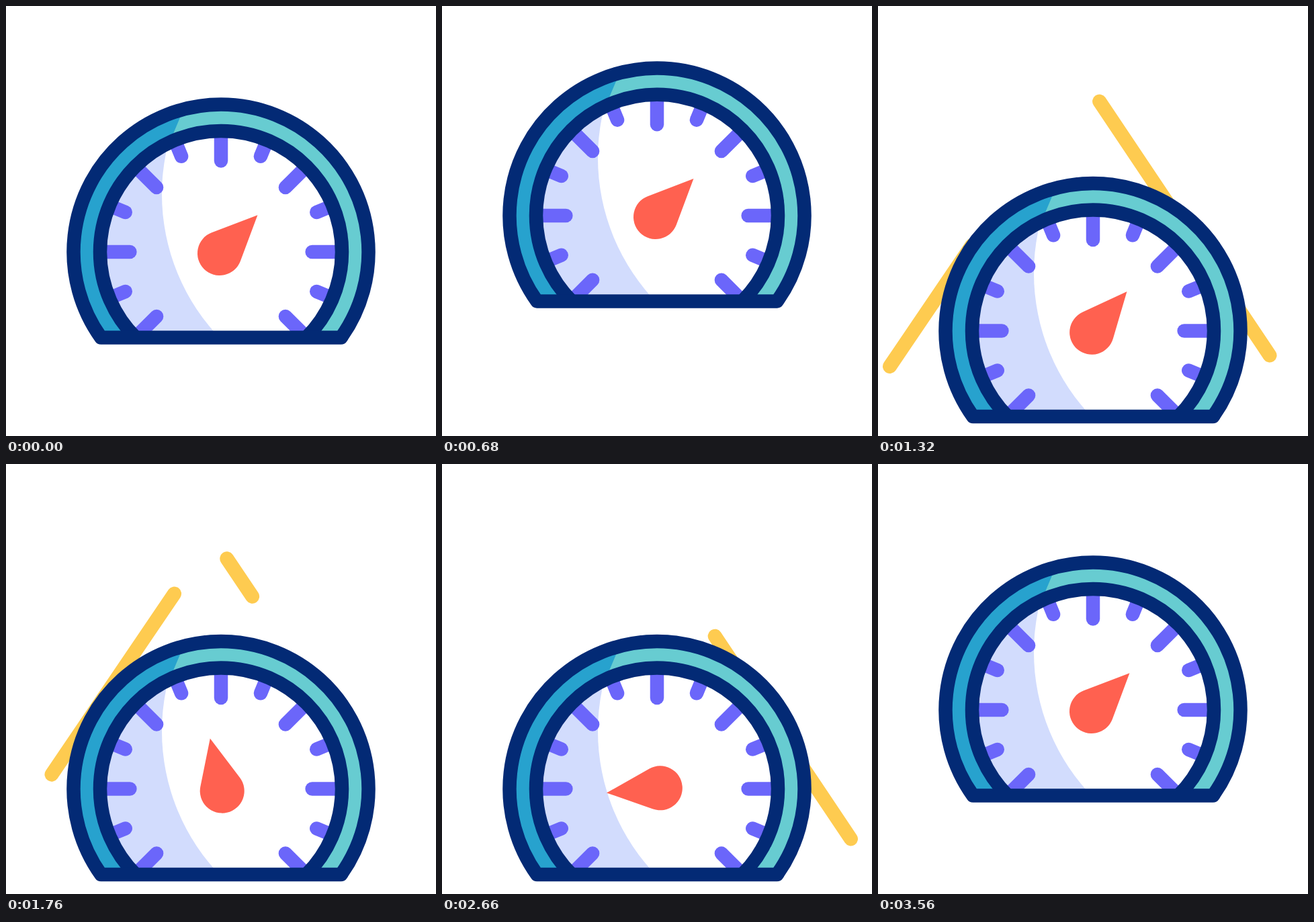
An HTML page that plays this animation: 640x640 px, repeating every 3600 ms.

```html
<!DOCTYPE html>
<html lang="en">
<head>
<meta charset="utf-8">
<title>Speed gauge</title>
<style>
html, body { margin: 0; width: 100%; height: 100%; overflow: hidden; background: #fff; }
svg { display: block; width: 100vw; height: 100vh; }
</style>
</head>
<body>
<svg viewBox="0 0 640 640">
  <defs>
    <clipPath id="dial"><path d="M193 493.5A180 180 0 1 1 447 493.5Z"/></clipPath>
    <clipPath id="rim"><path d="M141.3 493.5A219.5 219.5 0 1 1 498.7 493.5Z"/></clipPath>
  </defs>
  <g fill="none" stroke="#fecb50" stroke-width="21" stroke-linecap="round">
    <line id="left"/>
    <line id="right"/>
  </g>
  <g id="gauge">
    <g clip-path="url(#rim)">
      <rect x="90" y="136" width="460" height="368" fill="#67ccd1"/>
      <path d="M276 126L243 204V504H80V126Z" fill="#27a2ce"/>
    </g>
    <g clip-path="url(#dial)">
      <rect x="130" y="176" width="380" height="328" fill="#d2dcfd"/>
      <circle cx="541" cy="280" r="309" fill="#fff"/>
      <rect x="400" y="176" width="110" height="328" fill="#fff"/>
      <g id="ticks" stroke="#6b66fa" stroke-width="20.5" stroke-linecap="round"/>
    </g>
    <g fill="none" stroke="#032a75" stroke-width="20.5" stroke-linejoin="round">
      <path d="M193 493.5A180 180 0 1 1 447 493.5"/>
      <path d="M141.3 493.5A219.5 219.5 0 1 1 498.7 493.5Z"/>
    </g>
    <path id="needle" fill="#ff6150" d="M0 -76.1L30.1 -9.5A33 33 0 1 1 -30.1 -9.5Z"/>
  </g>
</svg>
<script>
const LOOP = 3600, STEP = 20;
const el = id => document.getElementById(id);
const clamp = x => Math.min(1, Math.max(0, x));
const smooth = x => x * x * (3 - 2 * x);
const cubic = x => x * x * x;
const mix = (a, b, k) => a + (b - a) * k;

// Keys are [time, value] pairs
const bodyKeys = [[117, 0], [583, -62.7], [1317, 117.5], [3163, 117.5], [3520, 0]];
const needleKeys = [[680, 44.8], [933, -36.4], [1187, 44.8], [2525, -102], [3555, 44.8]];

// A streak's head and tail run along one segment, once per start time
const streaks = [
  { node: el("left"), from: [285.5, 141.5], to: [17.5, 536.5],
    starts: [855, 1471, 2087], head: 400, lag: 0, tail: 570, leave: cubic },
  { node: el("right"), from: [328.8, 140.8], to: [608.5, 558],
    starts: [992, 1667, 2250], head: 403, lag: 320, tail: 260, leave: smooth }
];

function track(keys, t) {
  if (t <= keys[0][0]) return keys[0][1];
  for (let i = 1; i < keys.length; i++) {
    const [t0, a] = keys[i - 1], [t1, b] = keys[i];
    if (t < t1) return mix(a, b, smooth((t - t0) / (t1 - t0)));
  }
  return keys[keys.length - 1][1];
}

function drawStreak(s, t) {
  const start = s.starts.find(v => t >= v && t < v + s.lag + s.tail);
  s.node.style.display = start === undefined ? "none" : "";
  if (start === undefined) return;
  const age = t - start;
  const tail = s.leave(clamp((age - s.lag) / s.tail));
  const head = Math.max(tail, smooth(clamp(age / s.head)));
  [tail, head].forEach((k, i) => {
    s.node.setAttribute("x" + (i + 1), mix(s.from[0], s.to[0], k));
    s.node.setAttribute("y" + (i + 1), mix(s.from[1], s.to[1], k));
  });
}

function draw(t) {
  el("gauge").setAttribute("transform", `translate(0 ${track(bodyKeys, t)})`);
  el("needle").setAttribute("transform", `translate(320.8 365.2) rotate(${track(needleKeys, t)})`);
  streaks.forEach(s => drawStreak(s, t));
}

for (let i = -6; i <= 6; i++) {
  const tick = document.createElementNS("http://www.w3.org/2000/svg", "line");
  const inner = i % 2 ? 154 : 135.6;
  tick.setAttribute("y1", -inner);
  tick.setAttribute("y2", -180);
  tick.setAttribute("transform", `translate(320 366) rotate(${i * 22.5})`);
  el("ticks").append(tick);
}

let begin = null;
function frame(now) {
  if (begin === null) begin = now;
  draw(Math.floor(((now - begin) % LOOP) / STEP) * STEP);
  requestAnimationFrame(frame);
}
draw(0);
requestAnimationFrame(frame);
</script>
</body>
</html>
```
